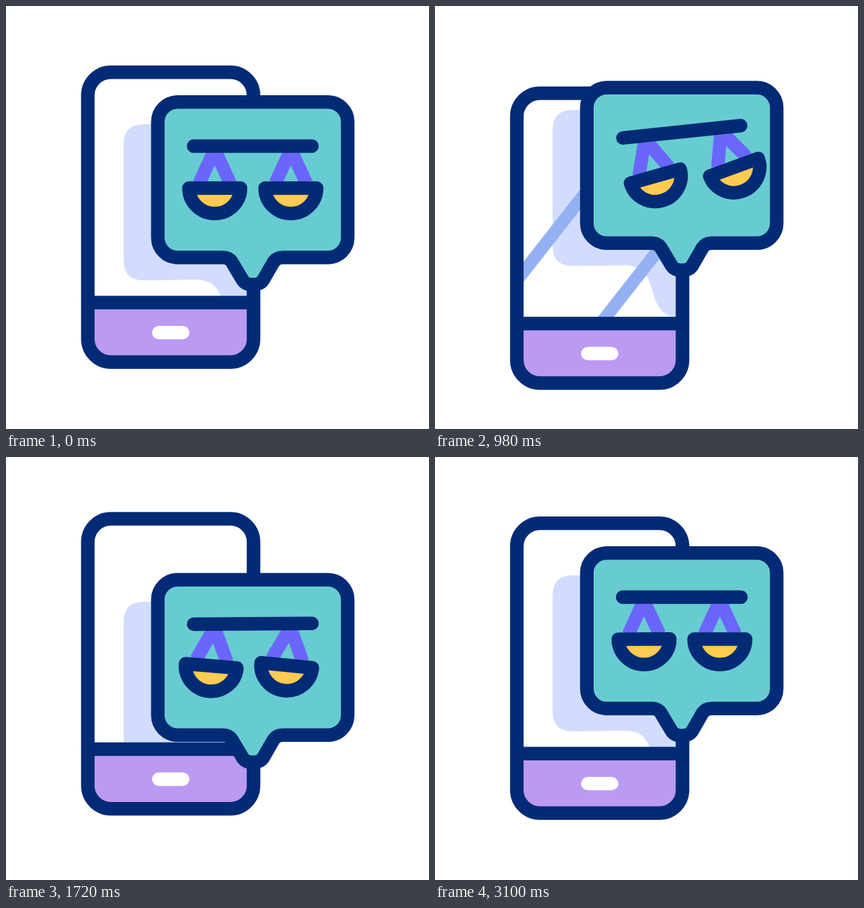
Write an HTML page that moves like this. It is 640 by 640 pixels and loops after 3600 ms.

```html
<!DOCTYPE html>
<html lang="en">
<head>
<meta charset="utf-8">
<title>Legal advice on the phone</title>
<style>
  html, body { margin: 0; height: 100%; overflow: hidden; background: #fff; }
  svg { display: block; width: 100%; height: 100%; }
  .ink { stroke: #032b75; stroke-width: 20.5; stroke-linecap: round; stroke-linejoin: round; }
</style>
</head>
<body>
<svg viewBox="0 0 640 640">
  <defs>
    <clipPath id="screen"><rect x="124" y="100" width="251" height="349" rx="35"/></clipPath>
    <g id="scale">
      <path d="M-23.5 56L0 5.5L23.5 56" fill="none" stroke="#6a66fb" stroke-width="20" stroke-linejoin="round"/>
      <path class="ink" d="M-39 63.5H39A39 38.5 0 0 1 -39 63.5Z" fill="#ffcb50"/>
    </g>
  </defs>

  <g id="phone">
    <g clip-path="url(#screen)">
      <path id="shadow" fill="#d2dcfd" d="M400 179H208Q178 179 178 209V385Q178 415 208 415L286 414C312 414 321 426 327 446S338 493 370 493H400Z"/>
      <path id="shine" d="M-89 90l-290 370M89 90l-290 370" stroke="#94b1f4" stroke-width="19"/>
    </g>
    <path fill="#bb9af2" d="M124 449H374.5V504Q374.5 539 339.500 539H159Q124 539 124 504Z"/>
    <rect class="ink" x="123.8" y="100.2" width="250.7" height="438.6" rx="35" fill="none"/>
    <path class="ink" d="M124 448.7H374"/>
    <rect x="221" y="484" width="56.5" height="20.3" rx="10.2" fill="#fff"/>
  </g>

  <g id="bubble">
    <path class="ink" fill="#67ccd1" d="M259.7 145.3H487A30 30 0 0 1 517 175.3V350.5A30 30 0 0 1 487 380.5H418.5
      C412 380.5 408 383 405 387L389.5 414C386 420 380 421.5 373.3 421.5S361 420 357.6 414L341.5 387
      C339 383 335 380.5 328 380.5H259.7A30 30 0 0 1 229.7 350.5V175.3A30 30 0 0 1 259.7 145.3Z"/>
    <g id="balance">
      <use id="left" href="#scale"/>
      <use id="right" href="#scale"/>
      <path class="ink" d="M-89.5 0H89.5"/>
    </g>
  </g>
</svg>

<script>
const LOOP = 3600, REST = 3100;

// Turning points of the two bounces: [ms, vertical offset].
const phoneBounce = [[0, 0], [600, -71], [1125, 55], [1560, -26], [1910, 18], [2060, 0]];
const bubbleBounce = [[0, 0], [650, -47], [1600, 43.5], [2336, 0]];

function ease(t, t0, t1, from, to) {
  const s = Math.min(1, Math.max(0, (t - t0) / (t1 - t0)));
  return from + (to - from) * s * s * (3 - 2 * s);
}

function bounce(t, points) {
  const i = points.findIndex(([time]) => time > t);
  if (i < 0) return 0;
  const [t0, from] = points[i - 1], [t1, to] = points[i];
  return ease(t, t0, t1, from, to);
}

// A swing that quickens as it dies away; a higher fade keeps it strong for longer.
function swing(t, { start = 0, size, halfTurns, quicken, fade }) {
  const u = Math.min(1, Math.max(0, (t - start) / (REST - start)));
  return -size * (1 - u ** fade) ** 1.5 * Math.sin(Math.PI * halfTurns * u ** quicken);
}

const beamSwing = { size: 15.8, halfTurns: 4.8, quicken: 1.48, fade: 4 };
const rightSwing = { start: 400, size: 24, halfTurns: 4, quicken: 1.15, fade: 1 };

function place(id, x, y, angle = 0) {
  document.getElementById(id).setAttribute("transform", `translate(${x} ${y}) rotate(${angle})`);
}

const begin = performance.now();

function draw(now) {
  const t = Math.max(0, now - begin) % LOOP;
  const phoneY = bounce(t, phoneBounce), bubbleY = bounce(t, bubbleBounce);
  place("phone", 0, phoneY);
  place("bubble", 0, bubbleY);
  place("shadow", 0, bubbleY - phoneY);
  place("shine", ease(t, 542, 1342, 20, 758), 0);
  place("balance", 373.4, 212, swing(t, beamSwing));
  // The left pan follows the beam a moment later.
  place("left", -57.6, 0, 0.95 * swing(t - 80, beamSwing));
  place("right", 57.6, 0, swing(t, rightSwing));
  requestAnimationFrame(draw);
}
draw(begin);
</script>
</body>
</html>
```
